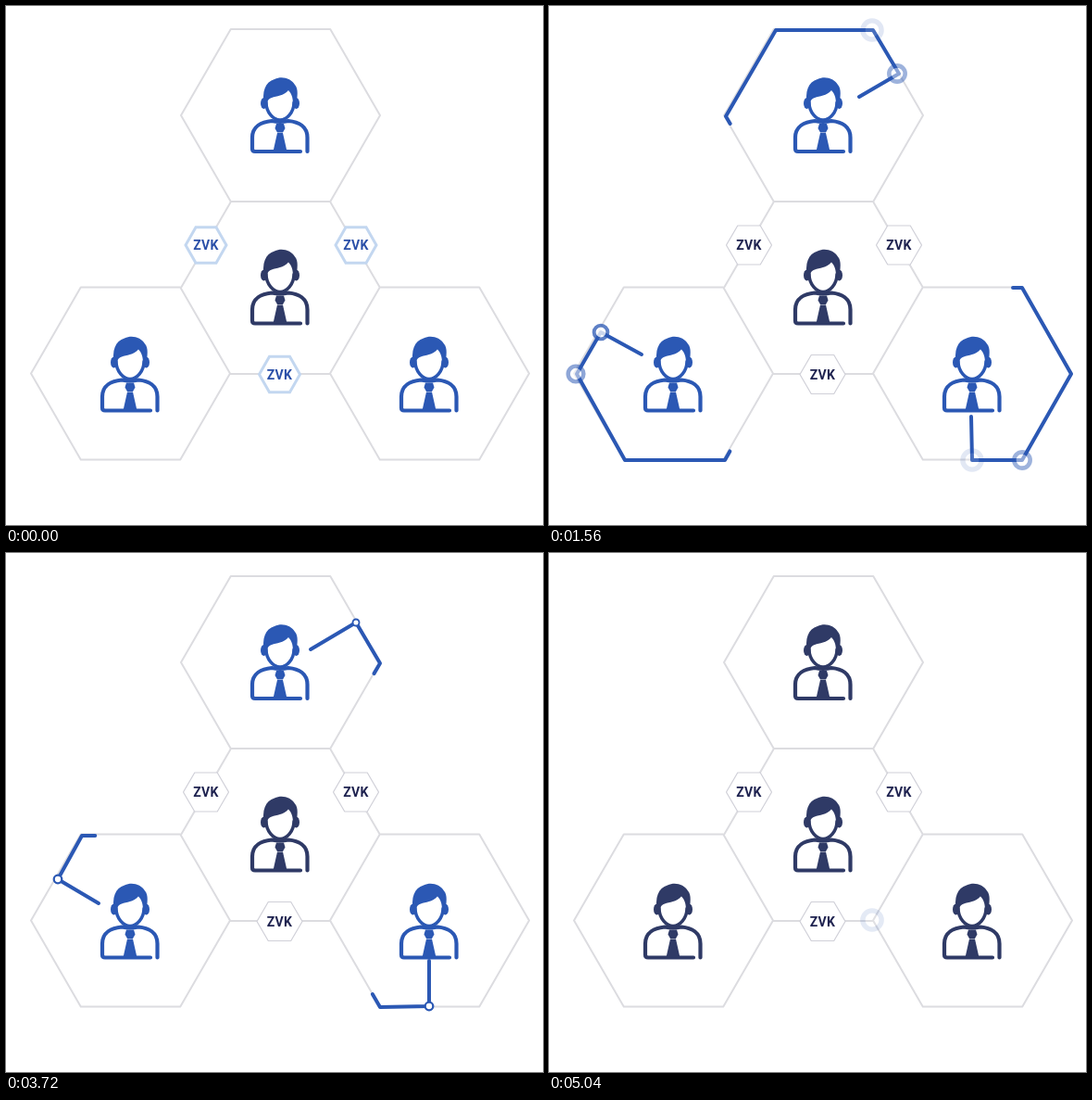
An HTML page that plays this animation: 580 px wide and 560 px high, repeating every 5.94 s.

```html
<!DOCTYPE html>
<html lang="en">
<head>
<meta charset="utf-8">
<title>Network exchange</title>
<style>
  html, body { margin: 0; width: 100%; height: 100%; overflow: hidden; background: #fff; }
  svg { display: block; }
  .grid { fill: none; stroke: #dcdce0; stroke-width: 2; stroke-linejoin: round; }
  .trail { fill: none; stroke: #2b58b4; stroke-width: 4; stroke-linecap: round; stroke-linejoin: round; }
  .ring { fill: #fff; stroke: #2b58b4; }
  .person path { fill: none; stroke: currentColor; stroke-width: 4.2; stroke-linecap: round; stroke-linejoin: round; }
  .person .solid { fill: currentColor; stroke: none; }
  text { font: 700 14px Roboto, Arial, sans-serif; letter-spacing: .4px; text-anchor: middle; }
</style>
</head>
<body>
<svg id="stage" width="580" height="560" viewBox="0 0 580 560">
  <defs>
    <g id="person" class="person">
      <path d="M22 39H-27Q-30 39-30 36V24C-30 12-20 7-9 6Q0 8 9 6C20 7 29.500 12 29.500 24V39"/>
      <path d="M-15-14C-15-3-7 5 0 5S15-3 15-14" style="stroke-width:3.500"/>
      <path class="solid" d="M-17-10C-20-26-16-36-6-39C2-43 12-40 16-33C20-29 19-20 17-10L14-12C14-20 12-24 9-27C4-21-4-21-9-19C-13-18-14-15-14-10Z"/>
      <ellipse class="solid" cx="-17.500" cy="-13" rx="3.500" ry="6"/>
      <ellipse class="solid" cx="17.500" cy="-13" rx="3.500" ry="6"/>
      <path class="solid" d="M-4 9H4L5.500 14L3 18.500H-3L-5.500 14ZM-3 19H3L7.500 39H-7.500Z"/>
    </g>
  </defs>
</svg>
<script>
const LOOP = 5940, LAST = 5040;
const BLUE = [43, 88, 180], DARK = [47, 58, 102];
const stage = document.getElementById('stage');

function add(tag, attrs, parent = stage) {
  const node = document.createElementNS('http://www.w3.org/2000/svg', tag);
  set(node, attrs);
  return parent.appendChild(node);
}
function set(node, attrs) {
  for (const key in attrs) node.setAttribute(key, attrs[key]);
}
const hexagon = (x, y, r, h) =>
  `M${x - r} ${y}L${x - r / 2} ${y - h}H${x + r / 2}L${x + r} ${y}L${x + r / 2} ${y + h}H${x - r / 2}Z`;
const progress = (t, from, to) => Math.min(1, Math.max(0, (t - from) / (to - from)));
const ease = p => (1 - Math.cos(Math.PI * p)) / 2;
const lerp = (a, b, p) => a + (b - a) * p;
const mix = (a, b, p) => `rgb(${a.map((v, i) => Math.round(lerp(v, b[i], p)))})`;

// Static cells and connectors
const cells = [[296.5, 118], [134.5, 396.5], [457.5, 396.5]];
add('path', {
  class: 'grid',
  d: cells.map(([x, y]) => hexagon(x, y, 107.5, 93)).join('') +
    'M243 211L189 304M350 211L404 304M242 397H350'
});

// Trails: from the badges to the people, then back
const trail = d => add('path', { class: 'trail', d, pathLength: 1 });
const inbound = [
  'M230 236L245 211L191 119L245 26H350L378 73L335 98',
  'M389 280L404 305L511 304L564 397L511 490H457L456 443',
  'M274 397.500H242L190 490H82L30 397L56 352L100 376'
].map(trail);
const outbound = [
  'M329 104L378 75L404 119L350 211L365 237',
  'M457 440V489L404 490L350 397.500H320',
  'M100 378L56 352L82 305L190 305.500L204 281'
].map(trail);

// x, y, start, duration
const rings = [
  [244, 28, 585, 650], [349, 26, 955, 650], [376, 73, 1060, 650],
  [510, 304, 396, 650], [563, 397, 695, 650], [511, 490, 940, 806], [457, 490, 1010, 590],
  [82, 489, 747, 650], [29, 397, 1010, 750], [56, 352, 1157, 650],
  [378, 75, 3575, 830], [404, 119, 3790, 830], [350, 211, 4125, 830],
  [457, 489, 3500, 830], [403, 489, 3957, 830], [349, 396, 4260, 830],
  [56, 352, 3500, 830], [82, 305, 3916, 830], [190, 305, 4140, 830]
].map(([cx, cy, start, duration]) =>
  ({ node: add('circle', { class: 'ring', cx, cy }), start, duration }));

const badges = [[216, 258], [378, 258], [295.5, 397.5]].map(([x, y]) => {
  const shape = add('path', { fill: '#fff' });
  const label = add('text', { x, y: y + 5 });
  label.textContent = 'ZVK';
  return { x, y, shape, label };
});

const person = (x, y) => add('use', { href: '#person', x, y });
const people = [[296, 118], [134, 397.5], [457, 397.5]].map(p => person(...p));
person(296, 303.5).style.color = mix(DARK, DARK, 0);

function drawTrail(node, head, tail, visible) {
  set(node, {
    visibility: visible && head > tail ? 'visible' : 'hidden',
    'stroke-dasharray': `${head - tail} 2`,
    'stroke-dashoffset': -tail
  });
}

function draw(t) {
  const headIn = ease(progress(t, 50, 1250));
  const tailIn = progress(Math.min(t, 2760), 1080, 2800);
  inbound.forEach(node => drawTrail(node, headIn, tailIn, t < 3240));

  const headOut = ease(progress(t, 3190, 4260));
  const tailOut = ease(progress(t, 4140, 4930));
  outbound.forEach(node => drawTrail(node, headOut, tailOut, true));

  for (const { node, start, duration } of rings) {
    const s = (t - start) / duration;
    const on = s > 0 && s < 1;
    set(node, { visibility: on ? 'visible' : 'hidden' });
    if (!on) continue;
    const outer = 2.5 + 11 * s, width = outer * .42;
    set(node, { r: outer - width / 2, 'stroke-width': width, opacity: Math.min(1, (1 - s) * 2) });
  }

  const calm = progress(t, 1080, 1250);
  for (const { x, y, shape, label } of badges) {
    set(shape, {
      d: hexagon(x, y, lerp(22, 24.5, calm), lerp(19.3, 21, calm)),
      stroke: mix([195, 215, 240], [208, 208, 216], calm),
      'stroke-width': lerp(3, 1.2, calm)
    });
    set(label, { fill: mix([43, 80, 168], [31, 35, 80], calm) });
  }

  const color = mix(BLUE, DARK, progress(t, 4170, 4350));
  people.forEach(node => { node.style.color = color; });
}

const begin = performance.now();
function tick() {
  draw(Math.min((performance.now() - begin) % LOOP, LAST));
  requestAnimationFrame(tick);
}
tick();
</script>
</body>
</html>
```
